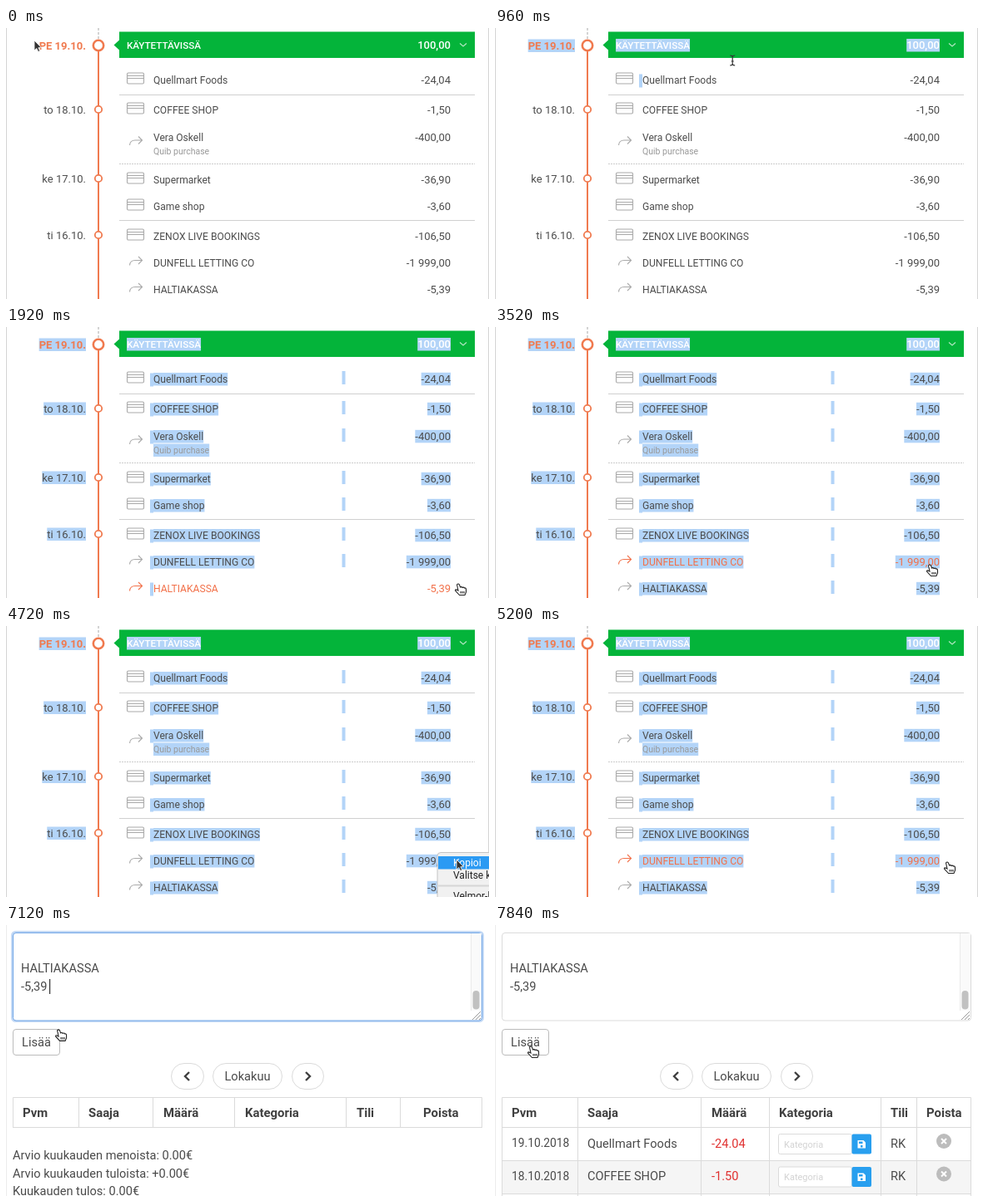
Recreate the animation shown at these times as an HTML page. Size 580 by 326 pixels, loop 8000 ms.

```html
<!DOCTYPE html>
<html lang="fi">
<head>
<meta charset="utf-8">
<style>
  html, body { margin: 0; width: 100%; height: 100%; overflow: hidden; background: #fff; }
  svg { display: block; width: 580px; height: 326px; font-family: Roboto, sans-serif; }
  .row { color: #4c4c4c; }
  .row text { fill: currentColor; }
  .row .note { fill: #999; }
  .icon { fill: none; stroke: #aaa; stroke-width: 1.1; }
  .row.hot { color: #f2714a; }
  .row.hot .note { fill: #f2714a; }
  .row.hot .icon { stroke: #f2714a; }
  .sel { fill: #b3d4f8; }
</style>
</head>
<body>
<svg id="stage" viewBox="0 0 580 326"></svg>
<script>
const LOOP = 8000, STEP = 80;
const ORANGE = '#f07a4f', GREEN = '#04b43a', LINE = '#dbdbdb', DARK = '#4a4a4a';
const stage = document.getElementById('stage');

function add(parent, tag, attrs = {}, content) {
  const el = document.createElementNS('http://www.w3.org/2000/svg', tag);
  for (const key in attrs) el.setAttribute(key, attrs[key]);
  if (content) el.textContent = content;
  return parent.appendChild(el);
}
const group = (parent, attrs) => add(parent, 'g', attrs);
const path = (parent, d, attrs) => add(parent, 'path', { d, fill: 'none', ...attrs });
const box = (parent, x, y, width, height, attrs) => add(parent, 'rect', { x, y, width, height, ...attrs });
const text = (parent, x, y, size, content, attrs) =>
  add(parent, 'text', { x, y: y + size * 0.36, 'font-size': size, ...attrs }, content);
const show = (el, on) => el.setAttribute('visibility', on ? 'inherit' : 'hidden');

// Selection highlights, each with the time it appears
const highlights = [];
function highlight(parent, x, y, width, height, at) {
  const el = box(parent, x, y, width, height, { class: 'sel' });
  highlights.push({ el, at });
  return el;
}
function selectable(parent, x, y, size, content, at, attrs = {}) {
  const label = text(parent, x, y, size, content, attrs);
  const width = label.getComputedTextLength();
  const left = attrs['text-anchor'] === 'end' ? x - width : x;
  parent.insertBefore(highlight(parent, left, y - 7.5, width, 15.5, at), label);
}

// ---------- Bank statement ----------
const statement = group(stage);
const END = { 'text-anchor': 'end' };
const selectAt = [480, 960, 1040, 1160, 1360, 1440, 1520, 1600, 1880, 2000];

box(statement, 0, 0, 1, 326, { fill: '#d4d4d4' });
box(statement, 579, 0, 1, 326, { fill: '#d4d4d4' });
path(statement, 'M111 0V14', { stroke: '#aaa', 'stroke-dasharray': '3 2' });
path(statement, 'M111 21V326', { stroke: ORANGE, 'stroke-width': 2 });
path(statement, 'M129.500 20.500L136 14.500V4.500H563V36H136V26.500Z', { fill: GREEN });
path(statement, 'M545 18.5L549 22L553 18.5', { stroke: '#b5e8c4', 'stroke-width': 1.1 });
path(statement, 'M136 80.5H563M136 231.5H563', { stroke: '#d0d0d0' });
path(statement, 'M136 163.5H563', { stroke: '#ccc', 'stroke-dasharray': '2 1' });

const bold = { fill: '#fff', 'font-weight': 500 };
selectable(statement, 145, 20.5, 11.7, 'KÄYTETTÄVISSÄ', selectAt[0], bold);
selectable(statement, 534, 20.5, 13, '100,00', selectAt[1], { ...bold, ...END });

[['PE 19.10.', 21, 0], ['to 18.10.', 98, 2], ['ke 17.10.', 181, 4], ['ti 16.10.', 249, 6]]
  .forEach(([date, y, index]) => {
    const first = index === 0;
    selectable(statement, 96, y, 13, date, selectAt[index],
      { ...END, fill: first ? ORANGE : '#4c4c4c', 'font-weight': first ? 700 : 400 });
    add(statement, 'circle', { cx: 111, cy: y, r: first ? 6.2 : 4.2, fill: '#fff',
      stroke: ORANGE, 'stroke-width': first ? 2.6 : 1.8 });
  });

const cardIcon = y => `M147 ${y - 6.5}H164Q165.500 ${y - 6.5} 165.500 ${y - 5}V${y + 5}` +
  `Q165.500 ${y + 6.5} 164 ${y + 6.5}H147Q145.500 ${y + 6.5} 145.500 ${y + 5}V${y - 5}` +
  `Q145.500 ${y - 6.5} 147 ${y - 6.5}M146 ${y - 3}H165M146 ${y}H165`;
const arrowIcon = y => `M148.500 ${y + 5}Q149 ${y - 1} 155 ${y - 1}H163` +
  `M159 ${y - 5.5}L163.500 ${y - 1}L159 ${y + 3.5}`;

const rows = [
  [62, 'Quellmart Foods', '-24,04', cardIcon],
  [98, 'COFFEE SHOP', '-1,50', cardIcon],
  [131, 'Vera Oskell', '-400,00', arrowIcon, 'Quib purchase'],
  [182, 'Supermarket', '-36,90', cardIcon],
  [214, 'Game shop', '-3,60', cardIcon],
  [250, 'ZENOX LIVE BOOKINGS', '-106,50', cardIcon],
  [282, 'DUNFELL LETTING CO', '-1 999,00', arrowIcon],
  [314, 'HALTIAKASSA', '-5,39', arrowIcon],
].map(([y, name, amount, icon, note], i) => {
  const row = group(statement, { class: 'row' });
  const begin = selectAt[i + 1], end = selectAt[i + 2];
  path(row, icon(note ? y + 5 : y - 1.5), { class: 'icon' });
  highlight(row, 173, y - 6.5, 4, 16, begin);
  selectable(row, 177, y + 0.5, 12.1, name, begin + 60);
  highlight(row, 403.5, y - 9, 4, 16, end);
  selectable(row, 534, y + 0.3, 13, amount, end, END);
  if (note) selectable(row, 177, y + 17, 10.5, note, end, { class: 'note' });
  return { row, top: y - 16, bottom: note ? y + 33 : y + 16 };
});

// Context menu
const menu = group(statement);
box(menu, 518, 272.5, 90, 70, { rx: 4, fill: '#f1f1f1', stroke: '#c4c4c4' });
const menuBar = box(menu, 519, 277, 80, 15.5, { fill: '#2b9af3' });
const copyLabel = text(menu, 537, 285, 12, 'Kopioi');
text(menu, 537, 300, 12, 'Valitse kaikki', { fill: '#222' });
path(menu, 'M519 312.500H580', { stroke: '#d6d6d6', 'stroke-width': 2 });
text(menu, 537, 325, 12, 'Velmor-haku', { fill: '#222' });

// ---------- Budget page ----------
const budget = group(stage);
const SIZE = 14.6, BOLD = { 'font-weight': 700, fill: '#404040' };
const label = (parent, x, y, content, attrs) => text(parent, x, y, SIZE, content, { fill: DARK, ...attrs });

box(budget, 0, 0, 580, 326, { fill: '#fff' });
box(budget, 0, 0, 1, 326, { fill: '#ececec' });
const glow = box(budget, 7.5, 8.5, 565, 107, { rx: 4, fill: 'none', stroke: '#c3d9f5', 'stroke-width': 3 });
const area = box(budget, 8.5, 9.5, 563, 105.5, { rx: 3.5, fill: '#fff' });
const placeholder = label(budget, 18, 30, 'Liitä rivejä tiliotteesta tähän', { fill: '#d8d8d8' });
const pasted = group(budget);
label(pasted, 18, 52, 'HALTIAKASSA');
label(pasted, 18, 74, '-5,39');
box(pasted, 558.5, 10, 12.5, 93, { fill: '#fafafa' });
path(pasted, 'M558.500 10V103', { stroke: '#ebebeb' });
box(pasted, 560.5, 79, 8, 22.5, { rx: 4, fill: '#c1c1c1' });
path(budget, 'M560 114L570 104M564 114L570 108M568 114L570 112', { stroke: '#999' });
const caret = box(budget, 17.5, 21, 1.2, 18, { fill: '#333' });

const addButton = box(budget, 8.5, 125.5, 56, 31, { rx: 3.5, fill: '#fff' });
const MIDDLE = { 'text-anchor': 'middle' };
label(budget, 36.5, 141, 'Lisää', MIDDLE);
[[198.500, 39], [248.500, 83], [343.500, 38]].forEach(([x, width]) =>
  box(budget, x, 166.5, width, 31, { rx: 15.5, fill: '#fff', stroke: LINE }));
label(budget, 290, 182, 'Lokakuu', MIDDLE);
path(budget, 'M220 177L215 182L220 187M360 177L365 182L360 187', { stroke: '#404040', 'stroke-width': 2.4 });

function table(columns, textX, bottom) {
  const g = group(budget);
  if (bottom > 250) box(g, 8, 284, 564, 39, { fill: '#f5f5f5' });
  path(g, `M8.500 ${bottom}V207.500H571.500V${bottom}M8 243.500H572` +
    columns.map(x => `M${x} 207V${bottom}`).join(''), { stroke: LINE });
  ['Pvm', 'Saaja', 'Määrä', 'Kategoria', 'Tili', 'Poista'].forEach((title, i) =>
    text(g, textX[i], 225.7, 14.9, title, BOLD));
  return g;
}

const emptyTable = table([87.5, 176.5, 274.5, 408.5, 473.5], [20, 99, 189, 287, 421, 501], 243.5);
['menoista: 0.00€', 'tuloista: +0.00€'].forEach((end, i) =>
  label(emptyTable, 8, 277 + i * 21.5, 'Arvio kuukauden ' + end));
label(emptyTable, 8, 320, 'Kuukauden tulos: 0.00€');

const filledTable = table([99.5, 247.5, 329.5, 463.5, 506.5], [20, 111, 260, 341, 475, 518], 326);
path(filledTable, 'M8 283.500H572M8 323.500H572', { stroke: LINE });
[['19.10.2018', 'Quellmart Foods', '-24.04'], ['18.10.2018', 'COFFEE SHOP', '-1.50']]
  .forEach(([date, payee, amount], i) => {
    const g = group(filledTable, { transform: `translate(0 ${i * 39.5})` });
    text(g, 20, 262.5, 13.8, date, { fill: DARK });
    label(g, 111, 262.5, payee);
    label(g, 260, 262.5, amount, { fill: '#e0302f' });
    box(g, 340.5, 251.5, 88, 24, { rx: 2, fill: '#fff', stroke: LINE });
    text(g, 347, 264, 11, 'Kategoria', { fill: '#d3d3d3' });
    box(g, 428.5, 251.5, 23.5, 24, { rx: 2, fill: '#289fef' });
    path(g, 'M435.500 259H442.500L445 261.500V268.500H435.500Z', { fill: '#fff' });
    path(g, 'M437 260.500H441.500V263H437ZM439 265H441.500V267.500H439Z', { fill: '#289fef' });
    label(g, 475, 262.5, 'RK');
    add(g, 'circle', { cx: 539, cy: 260, r: 9, fill: '#bcbcbc' });
    path(g, 'M536 257L542 263M542 257L536 263', { stroke: '#fff', 'stroke-width': 2 });
  });

// ---------- Pointer, drawn with the hot spot at 0,0 ----------
const pointer = group(stage);
const shapes = {
  arrow: path(pointer, 'M0 0V12L2.800 9.500L4.700 13.500L6.700 12.600L4.900 8.700H8.500Z',
    { fill: '#333', stroke: '#fff', 'stroke-width': 0.8 }),
  hand: path(pointer, 'M-1.500 1Q0 -1 1.500 1L2.500 4Q4 3 5 4.500Q6.500 3.500 7.500 5Q9.500 4.500 9.500 7V10L8 13.500H1.500L-3.500 8Q-3.500 6 -1 7.500L0 8ZM3 9V11.500M5 9V11.500M7 9V11.500',
    { fill: '#fff', stroke: '#222', 'stroke-width': 1.1 }),
  beam: path(pointer, 'M-3 -6Q0 -6 0 -4Q0 -6 3 -6M0 -4V4M-3 6Q0 6 0 4Q0 6 3 6M-1.500 1H1.500',
    { stroke: '#333', 'stroke-width': 1.2 }),
};
const route = [ // time, x, y
  [0, 34, 15], [320, 42, 18], [400, 42, 18], [720, 275, 24], [880, 275, 24], [1280, 373, 168],
  [1760, 542, 309], [1920, 543, 309], [2240, 546, 313], [2720, 546, 313], [3520, 522, 286],
  [3600, 522, 286], [4000, 519, 274], [4720, 541, 281], [5200, 543, 284], [5280, 543, 284],
  [5600, 153, 36], [6480, 153, 36], [7360, 43, 146], [LOOP, 43, 146],
];
function pointerAt(t) {
  const i = route.findIndex(stop => stop[0] > t);
  const [t0, x0, y0] = route[i - 1], [t1, x1, y1] = route[i];
  const p = (t - t0) / (t1 - t0), eased = p * p * (3 - 2 * p);
  return [x0 + (x1 - x0) * eased, y0 + (y1 - y0) * eased];
}

function render(t) {
  const [x, y] = pointerAt(t);
  const onBudget = t >= 5360, menuOpen = t >= 4000 && t < 5200;
  show(statement, !onBudget);
  show(budget, onBudget);

  highlights.forEach(({ el, at }) => show(el, t >= at));
  let overRow = false;
  rows.forEach(({ row, top, bottom }) => {
    const hot = !menuOpen && !onBudget && x > 136 && y - 6 >= top && y - 6 < bottom;
    row.classList.toggle('hot', hot);
    overRow = overRow || hot;
  });
  show(menu, menuOpen);
  show(menuBar, menuOpen && y > 277);
  copyLabel.setAttribute('fill', y > 277 ? '#fff' : '#222');

  const focused = t >= 5760 && t < 7440, hasText = t >= 6320, filled = t >= 7600;
  const overButton = onBudget && x < 65 && y > 125;
  show(glow, focused);
  area.setAttribute('stroke', focused ? '#6ea4e6' : LINE);
  show(placeholder, !hasText);
  show(pasted, hasText);
  caret.setAttribute('x', hasText ? 52 : 17.5);
  caret.setAttribute('y', hasText ? 65 : 21);
  show(caret, focused && !(t >= 6080 && t < 6320));
  addButton.setAttribute('stroke', overButton ? '#bbb' : LINE);
  show(emptyTable, !filled);
  show(filledTable, filled);

  const inArea = onBudget && y < 115;
  const kind = overRow || overButton ? 'hand' : inArea || (t >= 480 && t < 1280) ? 'beam' : 'arrow';
  for (const name in shapes) show(shapes[name], name === kind);
  pointer.setAttribute('transform', `translate(${x} ${y})`);
}

function tick() {
  const t = performance.now() % LOOP;
  render(t - t % STEP);
  requestAnimationFrame(tick);
}
tick();
</script>
</body>
</html>
```
